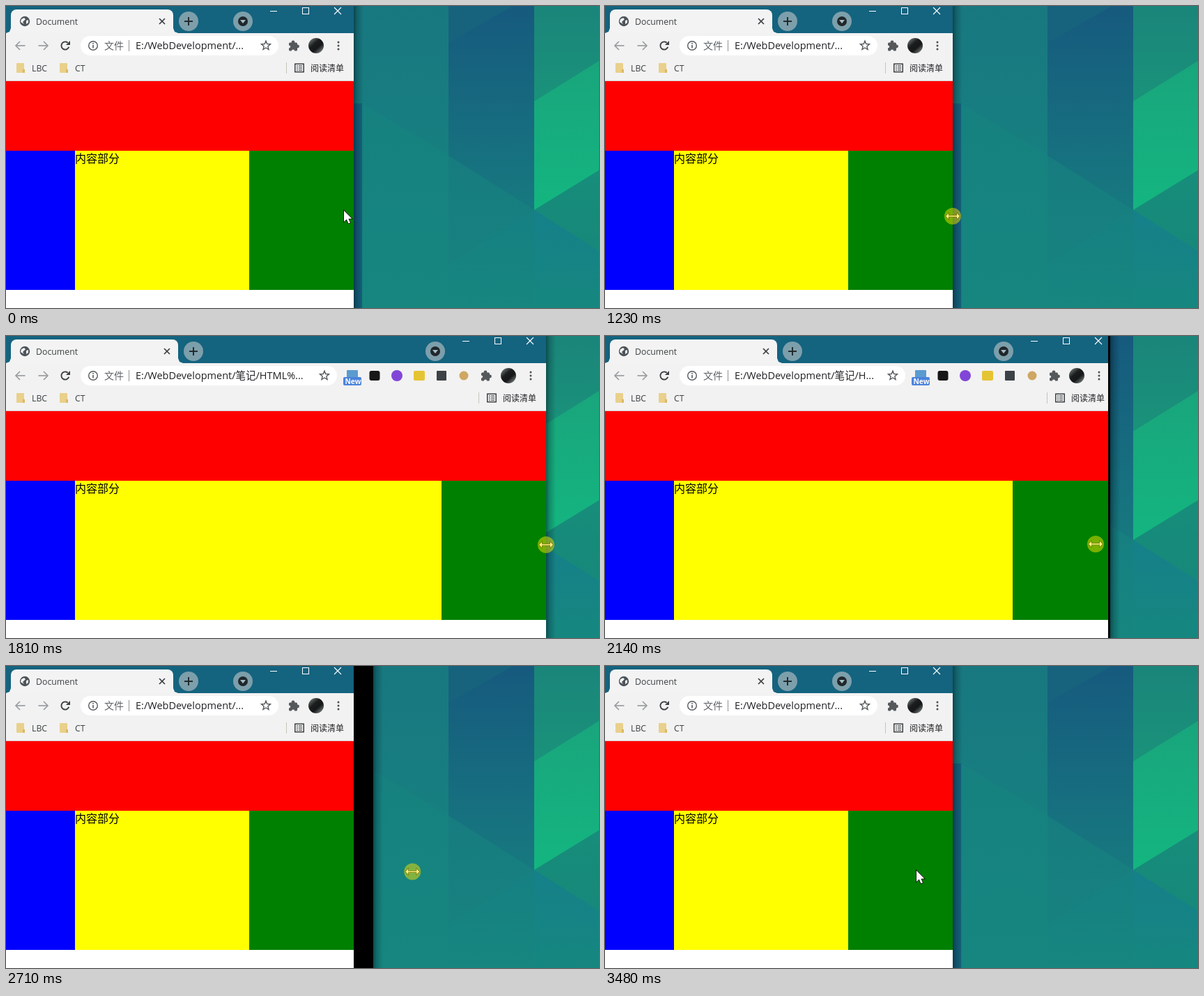
Animation of 851 by 434 pixels, one loop 4280 ms. Source, as an HTML page with a canvas:

```html
<!DOCTYPE html>
<html lang="zh-CN">
<head>
<meta charset="utf-8">
<title>Window resize</title>
<style>
html, body { margin: 0; width: 100%; height: 100%; overflow: hidden; background: #16807f; }
canvas { display: block; width: 851px; height: 434px; }
</style>
</head>
<body>
<canvas id="stage" width="851" height="434"></canvas>
<script>
const g = document.getElementById('stage').getContext('2d');
const LOOP = 4280, MIN_W = 499, PRESS = 1100, RELEASE = 3190;
const UI = '"Open Sans", "Noto Sans CJK SC", "Noto Sans CJK", sans-serif';
const INK = '#3c4043', ICON = '#55595c';
const URL_TEXT = 'E:/WebDevelopment/笔记/HTML%20CSS/布局/index.html';

// Mouse gestures: start ms, end ms, x, y
const moves = [
  [790, 790, 502, 298],
  [800, 890, 514, 302],
  [1030, 1090, MIN_W, 302],
  [1353, 1698, 775, 300],
  [2000, 2425, MIN_W, 296],
  [2610, 2830, 691, 295],
  [3005, 3230, 460, 286],
  [3440, 3480, 447, 294]
];

function mouse(t) {
  let x = 485, y = 294;
  for (const [from, to, nx, ny] of moves) {
    if (t < from) break;
    const u = t < to ? (t - from) / (to - from) : 1;
    const k = u * u * (3 - 2 * u);
    x += (nx - x) * k;
    y += (ny - y) * k;
  }
  return [x, y];
}

const dragged = t => t < PRESS ? MIN_W : Math.max(MIN_W, mouse(t)[0]);

// A window part follows the mouse late; growing needs a longer repaint than shrinking
const follow = (t, grow, shrink) => Math.round(Math.min(dragged(t - grow), dragged(t - shrink)));
const frameWidth = t => follow(t, 48, 25);
const headWidth = t => follow(t, 110, 33);
const pageWidth = t => follow(t, 110, 39);

// Toolbar icons slide in over 100 ms but vanish at once
const fitting = t => Math.min(6, Math.floor((pageWidth(t) - 492) / 32));

function iconCount(t) {
  let sum = 0;
  for (let ms = 5; ms < 100; ms += 10) sum += fitting(t - ms);
  return Math.min(fitting(t), sum / 10);
}

function rect(x, y, w, h, c) { g.fillStyle = c; g.fillRect(x, y, w, h); }

function pill(x, y, w, h, r, c) {
  g.beginPath(); g.roundRect(x, y, w, h, r);
  g.fillStyle = c; g.fill();
}

function disc(x, y, r, c) {
  g.beginPath(); g.arc(x, y, r, 0, 7);
  g.fillStyle = c; g.fill();
}

function trace(pts, close) {
  g.beginPath();
  pts.forEach(([x, y]) => g.lineTo(x, y));
  if (close) g.closePath();
}

function line(pts, c, w = 1) {
  trace(pts);
  g.strokeStyle = c; g.lineWidth = w; g.stroke();
}

function poly(pts, top, bottom = top) {
  const ys = pts.map(p => p[1]);
  const fill = g.createLinearGradient(0, Math.min(...ys), 0, Math.max(...ys));
  fill.addColorStop(0, top); fill.addColorStop(1, bottom);
  trace(pts, true);
  g.fillStyle = fill; g.fill();
}

function text(s, x, y, size, c = INK, weight = '') {
  g.font = `${weight} ${size}px ${UI}`;
  g.fillStyle = c;
  g.fillText(s, x, y);
}

// Slanted band filling a column from its left and right heights down
function band(x1, x2, y1, y2, top, bottom) {
  poly([[x1, y1], [x2, y2], [x2, 434], [x1, 434]], top, bottom);
}

function wallpaper() {
  band(490, 635, 0, 0, '#187880', '#168680');
  band(490, 635, 128, 215, '#168180', '#16867f');
  rect(490, 140, 21, 294, '#15637f');
  band(635, 758, 0, 0, '#17637e', '#17637e');
  band(635, 758, 53, -18, '#16587e', '#178880');
  band(635, 758, 215, 293, '#177c7f', '#178480');
  band(635, 758, 372, 293, '#168082', '#16867f');
  band(758, 851, 0, 0, '#1a857a', '#1ab07a');
  band(758, 851, 137, 79, '#19a57c', '#10c082');
  band(758, 851, 293, 236, '#178d7b', '#178579');
  band(758, 851, 293, 352, '#15808a', '#16877f');
}

function shadow(x) {
  const s = g.createLinearGradient(x, 0, x + 14, 0);
  s.addColorStop(0, 'rgba(0,20,30,.5)');
  s.addColorStop(.35, 'rgba(0,20,30,.24)');
  s.addColorStop(1, 'rgba(0,20,30,0)');
  rect(x, 0, 14, 434, s);
}

function globe(x, y) {
  disc(x, y, 7.2, '#4d5459');
  poly([[x - 5, y - 3], [x - 1, y - 5], [x + 1, y - 3], [x - 3, y + 1], [x - 1, y + 4], [x - 6, y + 1]], '#f3f3f3');
  poly([[x + 2, y - 1], [x + 5, y - 2], [x + 5, y + 2], [x + 2, y + 4]], '#f3f3f3');
}

function cross(x, y, r, c, w) {
  line([[x - r, y - r], [x + r, y + r]], c, w);
  line([[x - r, y + r], [x + r, y - r]], c, w);
}

function tabStrip(w) {
  const right = Math.min(247, w - 259), plus = right + 22, more = w - 159;
  rect(0, 0, w, 39, '#14637f');
  pill(7, 5, right - 7, 40, 8, '#f3f3f3');
  poly([[0, 39], [5, 37], [7, 32], [8, 39]], '#f3f3f3');
  poly([[right + 7, 39], [right + 2, 37], [right, 32], [right - 1, 39]], '#f3f3f3');
  globe(27, 22);
  text('Document', 43, 27, 12.3);
  cross(right - 16, 22, 4, INK, 1.7);

  disc(plus, 22, 14, '#7c9fab');
  line([[plus - 6, 22], [plus + 6, 22]], '#20272b', 1.9);
  line([[plus, 16], [plus, 28]], '#20272b', 1.9);
  disc(more, 22, 14, '#7c9fab');
  disc(more, 22, 7, '#20272b');
  poly([[more - 4, 20], [more + 4, 20], [more, 25]], '#a5bec6');

  line([[w - 120, 7.5], [w - 110, 7.5]], '#fff');
  g.strokeRect(w - 73.5, 2.5, 9, 9);
  cross(w - 23, 7, 5, '#fff', 1.1);
}

function arrow(x, dir) {
  line([[x - 6.5, 57], [x + 6.5, 57]], '#9a9da0', 1.7);
  line([[x + dir, 51], [x + dir * 7, 57], [x + dir, 63]], '#9a9da0', 1.7);
}

function reload(x, y) {
  g.beginPath(); g.arc(x, y, 5.6, .35, 5.4);
  g.strokeStyle = INK; g.lineWidth = 1.9; g.stroke();
  poly([[x + 7, y - 7], [x + 7, y - 1], [x + 1, y - 1]], INK);
}

function info(x, y) {
  g.beginPath(); g.arc(x, y, 6.3, 0, 7);
  g.strokeStyle = ICON; g.lineWidth = 1.4; g.stroke();
  rect(x - .8, y - 1, 1.6, 4.5, ICON);
  rect(x - .8, y - 4, 1.6, 1.7, ICON);
}

function star(x, y) {
  const pts = [];
  for (let i = 0; i < 10; i++) {
    const a = i * Math.PI / 5 - Math.PI / 2, r = i % 2 ? 3 : 6.8;
    pts.push([x + r * Math.cos(a), y + r * Math.sin(a)]);
  }
  trace(pts, true);
  g.strokeStyle = ICON; g.lineWidth = 1.4; g.stroke();
}

function puzzle(x, y) {
  pill(x - 7, y - 4.5, 12, 12, 1.5, ICON);
  disc(x - 1, y - 5, 2.4, ICON);
  disc(x + 5.5, y + 1, 2.4, ICON);
  disc(x - 7, y + 1.5, 2.1, '#f2f2f2');
  disc(x - 1, y + 7.5, 2.1, '#f2f2f2');
}

function avatar(x, y) {
  const s = g.createLinearGradient(x - 8, y - 9, x + 8, y + 9);
  s.addColorStop(0, '#69716e'); s.addColorStop(.35, '#1b1d1e');
  s.addColorStop(.65, '#151718'); s.addColorStop(1, '#737876');
  disc(x, y, 11, s);
}

const extensions = [
  x => disc(x, 57, 6.5, '#cfa663'),
  x => pill(x - 7, 50, 14, 14, 1, '#3c4246'),
  x => pill(x - 8, 50, 16, 14, 2, '#e5c433'),
  x => disc(x, 57, 8, '#8146d8'),
  x => pill(x - 7.5, 50, 15, 14, 3, '#171717'),
  x => {
    pill(x - 8, 49, 16, 12, 1, '#5a9bd0');
    pill(x - 13, 59, 26, 12, 2, '#4b83dc');
    text('New', x - 10.5, 69, 10.3, '#fff', 'bold');
  }
];

function elide(s, max) {
  g.font = `14.5px ${UI}`;
  let n = s.length;
  while (n > 1 && g.measureText(s.slice(0, n) + '...').width > max) n--;
  return s.slice(0, n) + '...';
}

function toolbar(w, count) {
  const right = w - 108 - 32 * count;
  rect(0, 39, w, 68, '#f2f2f2');
  rect(0, 107, w, 1, '#d6d0d0');
  arrow(21, -1);
  arrow(53, 1);
  reload(85, 57);

  pill(107, 43, right - 107, 28, 14, '#fff');
  info(125, 57);
  text('文件', 141, 62, 14, '#5f6368');
  rect(176, 49, 1, 16, '#8f9396');
  text(elide(URL_TEXT, right - 227.5), 186, 62, 14.5, '#202124');
  star(right - 18, 57);

  for (let i = Math.ceil(count); i > 0; i--) extensions[i - 1](w - 86 - 32 * Math.min(i, count));
  puzzle(w - 86, 57);
  avatar(w - 54, 57);
  for (let y = 52; y <= 62; y += 5) disc(w - 22, y, 1.5, '#4b4f52');
}

function folder(x, name) {
  pill(x, 82, 11, 14, 1, '#e9d08b');
  rect(x + 9, 91, 3, 5, '#dcb95f');
  text(name, x + 22, 94, 12.3);
}

function bookmarks(w) {
  folder(15, 'LBC');
  folder(77, 'CT');
  rect(w - 97, 81, 1, 16, '#c3c7b8');
  g.strokeStyle = INK; g.lineWidth = 1.5;
  g.strokeRect(w - 84.25, 83.25, 12.5, 11.5);
  for (let y = 85.5; y < 92; y += 3) {
    rect(w - 82, y, 2, 1.2, INK);
    rect(w - 79, y, 5, 1.2, INK);
  }
  text('阅读清单', w - 62, 94, 12, '#202124');
}

function page(w) {
  rect(0, 108, w, 326, '#fff');
  rect(0, 108, w, 100, '#f00');
  rect(0, 208, 99, 200, '#00f');
  rect(99, 208, w - 249, 200, '#ff0');
  rect(w - 150, 208, 150, 200, '#008000');
  text('内容部分', 99, 225, 16, '#000');
}

function outlined(pts, x, y) {
  trace(pts.map(p => [x + p[0], y + p[1]]), true);
  g.strokeStyle = '#000'; g.lineWidth = 1.4; g.stroke();
  g.fillStyle = '#fff'; g.fill();
}

function pointer(x, y) {
  outlined([[0, 0], [0, 16], [3.8, 12.6], [6.4, 18.6], [9, 17.5], [6.5, 11.7], [11.4, 11.5]], x, y);
}

function resizer(x, y) {
  const half = [[-10, 0], [-6, -4], [-6, -.7], [6, -.7], [6, -4]];
  outlined(half.concat(half.map(([a, b]) => [-a, -b])), x, y);
}

function cursor(t) {
  const [x, y] = mouse(t);
  const atEdge = (t >= 790 && t < 860) || (t >= 1030 && t < RELEASE);
  (atEdge ? resizer : pointer)(x, y);
  if (t >= PRESS && t < RELEASE) disc(x, y, 12, 'rgba(240,225,0,.5)');
}

function draw(t) {
  const edge = frameWidth(t), head = headWidth(t);
  const view = edge < head ? Math.max(MIN_W, edge - 3) : head;

  wallpaper();
  shadow(edge);
  rect(0, 0, edge, 434, '#000');
  g.save();
  g.beginPath(); g.rect(0, 0, view, 434); g.clip();
  page(pageWidth(t));
  tabStrip(head);
  toolbar(head, iconCount(t));
  bookmarks(head);
  g.restore();
  cursor(t);
}

const start = performance.now();
function tick() {
  draw((performance.now() - start) % LOOP);
  requestAnimationFrame(tick);
}
tick();
</script>
</body>
</html>
```
